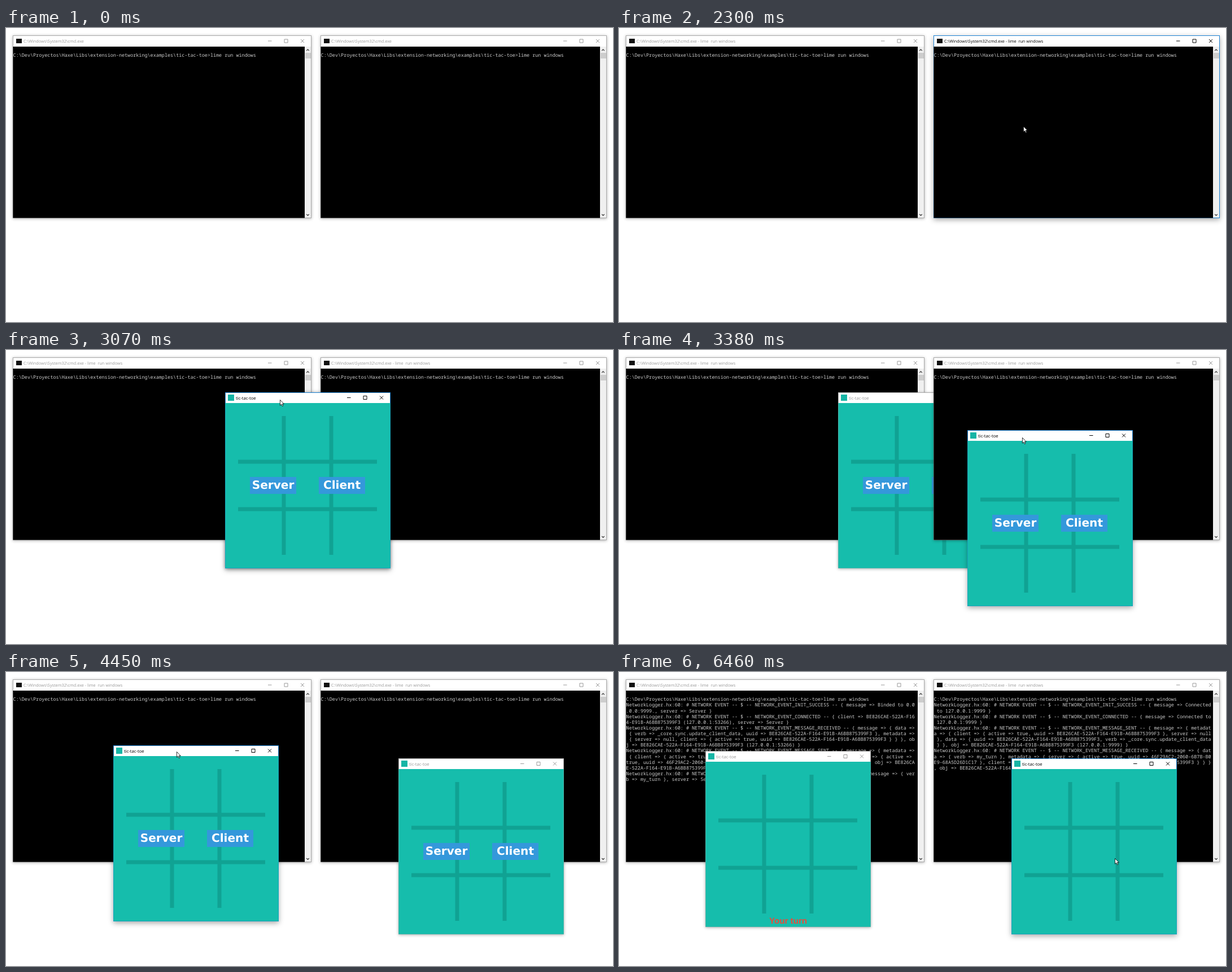
Write an HTML page that moves like this. It is 1075 by 521 pixels and loops after 8 s.

```html
<!DOCTYPE html>
<html lang="en">
<head>
<meta charset="utf-8">
<title>Tic-tac-toe over the network</title>
<style>
html, body { margin: 0; width: 100%; height: 100%; overflow: hidden; background: #fff; }
body { position: relative; text-rendering: geometricPrecision; }
.win {
  position: absolute; left: 0; top: 0; box-sizing: border-box;
  border: 1px solid #aaa; color: #999; background: #fff;
  box-shadow: 0 1px 5px rgba(0, 0, 0, .32);
}
.win.active { color: #000; border-color: #1c82d4; box-shadow: 0 3px 9px rgba(0, 0, 0, .34); }
.win svg { position: absolute; left: -1px; top: -1px; }
.title { font-family: "Open Sans", sans-serif; fill: currentColor; white-space: pre; }
.controls { fill: none; stroke: currentColor; }
.log {
  position: absolute; left: -.4px; top: 30.3px; margin: 0; color: #ccc;
  font: 8.45px/10.13px "Noto Sans Mono", monospace;
}
.label { font: bold 20.1px "DejaVu Sans", sans-serif; fill: #fff; text-anchor: middle; }
.status { font: bold 15.2px "Liberation Sans", Arial, sans-serif; fill: #e74c3c; text-anchor: middle; }
#mouse { position: absolute; left: 0; top: 0; z-index: 9; overflow: visible; }
</style>
</head>
<body>
<svg id="mouse" width="9" height="13">
  <path d="M.4.4V10.2L2.7 8.1 4.3 11.6 5.9 10.9 4.4 7.5H7.3Z" fill="#fff" stroke="#000" stroke-width=".8"/>
</svg>
<script>
const LOOP = 8000, START = 130, TICK = 77.1;
const rect = (x, y, w, h, fill) => `<rect x="${x}" y="${y}" width="${w}" height="${h}" fill="${fill}"/>`;

function addWindow(w, h, titleSize, titleY, controlY, body, extra = '') {
  const el = document.createElement('div');
  el.className = 'win';
  el.style.width = w + 'px';
  el.style.height = h + 'px';
  el.innerHTML = `<svg width="${w}" height="${h}">
    ${rect(1, 1, w - 2, 19, '#fff')}
    <text class="title" x="19" y="${titleY}" font-size="${titleSize}"></text>
    <path class="controls" d="M${w - 77} ${controlY}h6.5M${w - 48} ${controlY - 3}h6v6h-6z
      M${w - 19} ${controlY - 3}l6 6m0-6l-6 6"/>
    ${body}</svg>${extra}`;
  document.body.append(el);
  return el;
}

function addConsole(w, x) {
  const h = 324, bar = w - 12, mid = w - 6.5;
  const el = addWindow(w, h, 7.3, 13, 10,
    rect(6, 6, 10, 8, '#111') +
    rect(.4, 20, bar - .4, h - 20.4, '#000') +
    rect(bar, 20, 11, h - 21, '#f0f0f0') +
    rect(bar + 1, 31, 10, 10, '#cdcdcd') +
    `<path d="M${mid - 2.3} 27.2l2.3-2.3 2.3 2.3M${mid - 2.3} 317l2.3 2.3 2.3-2.3"
      fill="none" stroke="#444" stroke-width="1.3"/>`,
    '<pre class="log"></pre>');
  place(el, [x, 13]);
  return el;
}

function addGame() {
  const w = 293, h = 312;
  const bars = [100.5, 184.5].map(v => rect(v, 42, 7, 246, '#10a293')).join('') +
    [119.5, 203.5].map(v => rect(23, v, 246, 7, '#10a293')).join('');
  const button = (x, name) => rect(x, 150, 82, 30, '#3498db') +
    `<text class="label" x="${x + 41}" y="171">${name}</text>`;
  const el = addWindow(w, h, 7.7, 12.5, 9.5,
    rect(5, 4, 11, 11, '#16b5a5') + rect(.4, 19, w - .8, h - 19.4, '#16bdac') + bars +
    `<g class="menu">${button(44, 'Server')}${button(166, 'Client')}</g>
     <text class="status" x="${w / 2}" y="306"></text>`);
  setText(el, '.title', 'tic-tac-toe');
  return el;
}

function place(el, [x, y]) { el.style.transform = `translate(${x}px, ${y}px)`; }
function show(el, on) { el.style.visibility = on ? 'visible' : 'hidden'; }
function setText(el, selector, text) {
  const node = el.querySelector(selector);
  if (node.textContent !== text) node.textContent = text;
}

// Linear path through [tick, x, y] points
function along(path, k) {
  const i = path.findIndex(p => p[0] > k);
  if (i === 0) return path[0].slice(1);
  if (i < 0) return path[path.length - 1].slice(1);
  const [a, ax, ay] = path[i - 1], [b, bx, by] = path[i], f = (k - a) / (b - a);
  return [Math.round(ax + (bx - ax) * f), Math.round(ay + (by - ay) * f)];
}

const prompt = 'C:\\Dev\\Proyectos\\Haxe\\Libs\\extension-networking\\examples\\tic-tac-toe>lime run windows';
const clientId = 'BE826CAE-522A-F164-E91B-A6BB875399F3';
const serverId = '46F29AC2-2060-6B7B-B0E9-68A5D26D1C17';
const peer = id => `{ active => true, uuid => ${id} }`;
const event = (name, data) => `NetworkLogger.hx:60: # NETWORK EVENT -- $ -- NETWORK_EVENT_${name} -- { ${data} }`;
const wrap = (entries, columns) =>
  entries.flatMap(e => e.match(new RegExp(`.{1,${columns}}`, 'g'))).join('\n');

const bound = event('INIT_SUCCESS', 'message => Binded to 0.0.0.0:9999., server => Server');
const from = `obj => ${clientId} (127.0.0.1:53266)`;
const serverLog = [
  event('CONNECTED', `client => ${clientId} (127.0.0.1:53266), server => Server`),
  event('MESSAGE_RECEIVED', `message => { data => { verb => _core.sync.update_client_data, uuid => ${clientId} }, ` +
    `metadata => { server => null, client => ${peer(clientId)} } }, ${from}`),
  event('MESSAGE_SENT', `message => { metadata => { client => ${peer(clientId)}, server => ${peer(serverId)} }, ` +
    `verb => _core.sync.state_data, ${from}`),
  event('MESSAGE_BROADCASTING', 'message => { verb => my_turn }, server => Server')
];
const to = `obj => ${clientId} (127.0.0.1:9999)`;
const clientLog = [
  event('INIT_SUCCESS', 'message => Connected to 127.0.0.1:9999'),
  event('CONNECTED', 'message => Connected to 127.0.0.1:9999'),
  event('MESSAGE_SENT', `message => { metadata => { client => ${peer(clientId)}, server => null }, ` +
    `data => { uuid => ${clientId}, verb => _core.sync.update_client_data } }, ${to}`),
  event('MESSAGE_RECEIVED', `message => { data => { verb => my_turn }, ` +
    `metadata => { server => ${peer(serverId)}, client => ${peer(clientId)} } }, ${to}`)
];

const mousePath = [
  [0, 977, 512], [1, 690, 345], [2, 520, 262], [3, 462, 237], [5, 462, 236], [6, 462, 236],
  [10, 422, 206], [15, 422, 206], [19, 784, 180], [26, 784, 180], [34, 511, 157], [38, 485, 88],
  [40, 485, 88], [41, 597, 123], [42, 714, 155], [43, 801, 166], [45, 801, 166], [47, 792, 166],
  [51, 500, 86], [53, 500, 86], [56, 302, 141], [60, 265, 151], [61, 265, 151], [67, 241, 306],
  [71, 241, 306], [78, 878, 330]
];
const serverPath = [[53, 388, 75], [56, 190, 130], [60, 153, 140]];
const clientPath = [[40, 388, 75], [41, 500, 110], [42, 617, 142], [43, 704, 153], [45, 704, 153], [47, 695, 153]];

const mouse = document.getElementById('mouse');
const leftConsole = addConsole(529, 12);
const serverGame = addGame();
const rightConsole = addConsole(507, 557);
const clientGame = addGame();
const windows = [leftConsole, serverGame, rightConsole, clientGame];

function focused(k) {
  if (k >= 79) return clientGame;
  if (k >= 52) return serverGame;
  if (k >= 38) return clientGame;
  if (k >= 33) return null;
  if (k >= 21) return rightConsole;
  return k >= 12 ? leftConsole : null;
}

function draw(k) {
  const active = focused(k);
  windows.forEach(w => w.classList.toggle('active', w === active));

  const title = running => 'C:\\Windows\\System32\\cmd.exe' + (running ? ' - lime  run windows' : '');
  setText(leftConsole, '.title', title(k >= 16));
  setText(rightConsole, '.title', title(k >= 23));

  const hosting = k >= 70, joined = k >= 80;
  setText(leftConsole, '.log', wrap([prompt, ...(hosting ? [bound] : []), ...(joined ? serverLog : [])], 101));
  setText(rightConsole, '.log', wrap([prompt, ...(joined ? clientLog : [])], 97));

  place(serverGame, along(serverPath, k));
  place(clientGame, along(clientPath, k));
  serverGame.style.zIndex = k >= 52 ? 1 : 0;
  serverGame.style.display = k >= 29 ? '' : 'none';
  clientGame.style.display = k >= 38 ? '' : 'none';
  show(serverGame.querySelector('.menu'), !hosting);
  show(clientGame.querySelector('.menu'), !joined);
  setText(serverGame, '.status', joined ? 'Your turn' : hosting ? 'Waiting for client to connect...' : '');

  show(mouse, k >= 0);
  place(mouse, along(mousePath, k));
}

let last;
function frame() {
  const k = Math.floor((performance.now() % LOOP - START) / TICK);
  if (k !== last) draw(last = k);
  requestAnimationFrame(frame);
}
frame();
</script>
</body>
</html>
```
